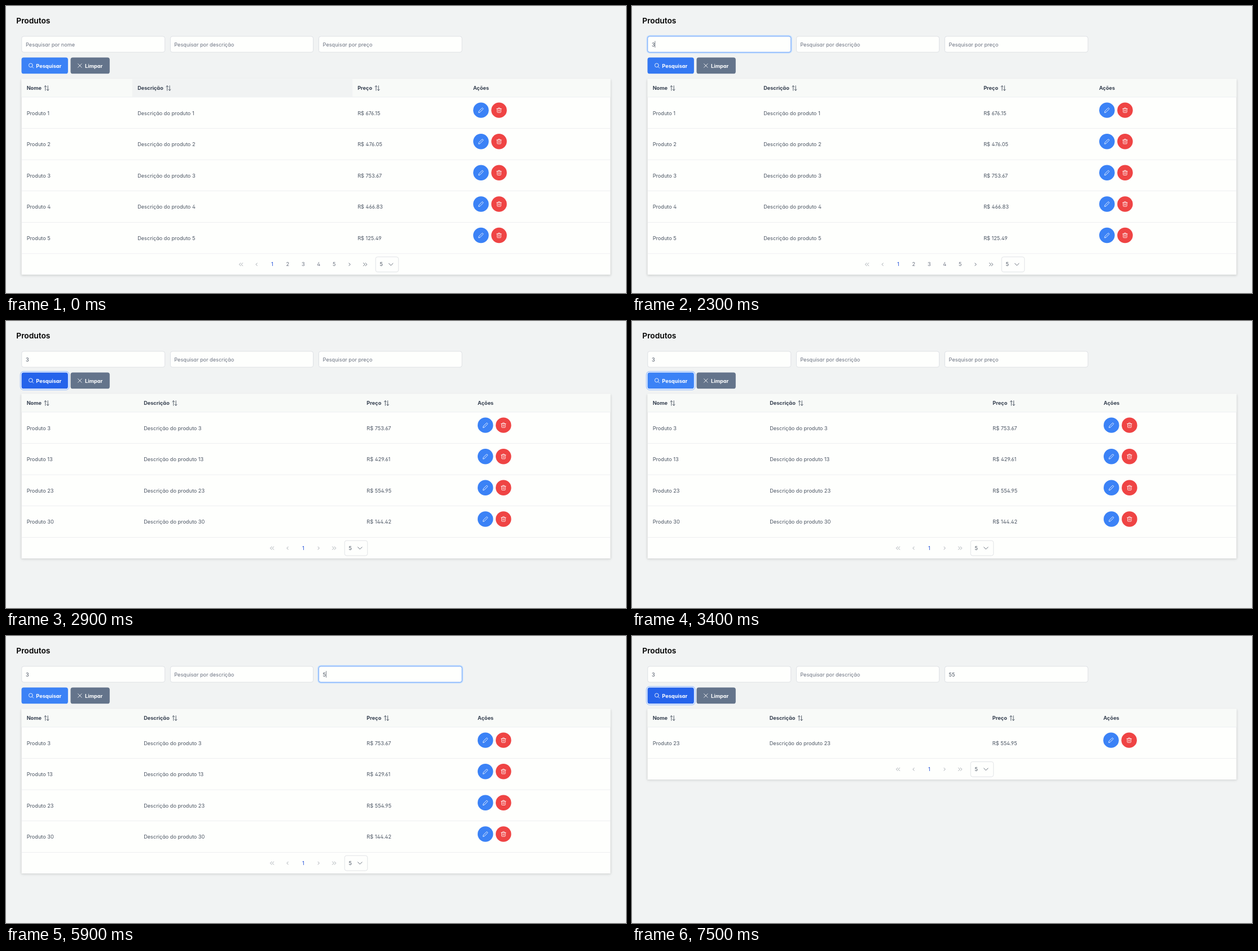
An HTML page that plays this animation: 1099 px wide and 510 px high, repeating every 8000 ms.

```html
<!DOCTYPE html>
<html lang="pt-BR">
<head>
<meta charset="utf-8">
<title>Produtos</title>
<style>
html, body { margin: 0; width: 100%; height: 100%; overflow: hidden; background: #f1f3f3; }
* { box-sizing: border-box; }
#app {
  position: absolute; left: 0; top: 0; width: 1680px; height: 780px;
  transform: scale(calc(1099 / 1680)); transform-origin: 0 0;
  font: 14px/21px Inter, sans-serif; color: #4b5563; white-space: pre;
  font-feature-settings: "cv02", "cv03", "cv04", "cv11"; font-optical-sizing: none;
}
svg { width: 14px; height: 14px; flex: none; overflow: visible; fill: none; stroke: currentColor; stroke-width: 1.3; stroke-linecap: round; stroke-linejoin: round; }
h1 { position: absolute; left: 28px; top: 27px; margin: 0; font-size: 21px; line-height: 25px; font-weight: 600; color: #000; }
.field, .button { position: absolute; height: 44px; display: flex; align-items: center; border-radius: 6px; }
.field { top: 82px; width: 388.5px; padding: 0 10.5px; background: #fefffd; border: 1px solid #d1d5db; }
.hint { color: #6b7280; }
.caret { width: 1px; height: 18px; margin-right: -1px; background: #374151; }
.button { top: 140px; padding-left: 18.5px; gap: 7px; color: #fff; font-weight: 700; }
#search { left: 42px; width: 126px; }
#clear { left: 174.5px; width: 106px; background: #64748b; }
#table {
  position: absolute; left: 42px; top: 198px; width: 1596px; background: #fefffd;
  box-shadow: 0 4px 10px rgb(0 0 0 / .03), 0 0 2px rgb(0 0 0 / .06), 0 2px 6px rgb(0 0 0 / .12);
}
.row { display: grid; height: 85px; border-bottom: 1px solid #e5e7eb; }
.row > div { display: flex; align-items: center; gap: 7px; padding-left: 14px; }
.head { height: 50px; background: #f8faf8; color: #374151; font-weight: 700; }
.row > .actions { align-items: flex-start; padding-top: 14px; }
.round { width: 42px; height: 42px; border-radius: 50%; display: grid; place-items: center; color: #fff; }
.pages { display: flex; justify-content: center; align-items: center; height: 57px; color: #6b7280; }
.pages > span { width: 42px; display: grid; place-items: center; }
.pages .on { color: #1d4ed8; }
.pages .arrow { color: #4b5563; }
.pages .off { opacity: .6; }
.size { width: 62.5px; height: 42px; margin-left: 7px; padding: 0 13px 0 10.5px; display: flex; align-items: center; justify-content: space-between; border: 1px solid #d1d5db; border-radius: 6px; color: #4b5563; }
</style>
</head>
<body>
<div id="app">
  <h1>Produtos</h1>
  <div class="field" id="name" style="left:42px"></div>
  <div class="field" id="description" style="left:444.5px"></div>
  <div class="field" id="price" style="left:847px"></div>
  <div class="button" id="search"></div>
  <div class="button" id="clear"></div>
  <div id="table"></div>
</div>
<script>
const LOOP = 8000, STEP = 100;
const $ = id => document.getElementById(id);
const icon = path => `<svg viewBox="0 0 14 14"><path d="${path}"/></svg>`;

const icons = {
  search: icon('M11.2 6A5.2 5.2 0 1 1 .8 6A5.2 5.2 0 1 1 11.2 6M9.8 9.8L13.4 13.4'),
  times: icon('M2 2L12 12M12 2L2 12'),
  sort: icon('M3.8 13.6V.6M.8 3.6L3.8 .6L6.8 3.6M10.4 .6V13.6M7.4 10.6L10.4 13.6L13.4 10.6'),
  pencil: icon('M.8 13.2L1.5 9.6L9.7 1.3Q10.7 .4 11.7 1.3L12.7 2.3Q13.6 3.3 12.7 4.3L4.4 12.5Z'),
  trash: icon('M.6 3H13.4M4.4 3V1.6Q4.4 .6 5.4 .6H8.6Q9.6 .6 9.6 1.6V3M2 3V12Q2 13.4 3.4 13.4H10.6Q12 13.4 12 12V3M5.4 6.2V10.2M8.6 6.2V10.2'),
  first: icon('M6 3L2.2 7L6 11M11.4 3L7.6 7L11.4 11'),
  prev: icon('M8.6 3.4L5.2 7L8.6 10.6'),
  next: icon('M5.4 3.4L8.8 7L5.4 10.6'),
  last: icon('M2.6 3L6.4 7L2.6 11M8 3L11.8 7L8 11'),
  down: icon('M1.4 4.2L7 9.8L12.6 4.2')
};

// Result sets: when each appears, its column starts, page count and [number, price] rows.
const results = [
  { from: 0, cols: [0, 300.4, 896.6, 1209.6], pages: 5,
    rows: [[1, '676.15'], [2, '476.05'], [3, '753.67'], [4, '466.83'], [5, '125.49']] },
  { from: 2900, cols: [0, 317.2, 921.4, 1222], pages: 1,
    rows: [[3, '753.67'], [13, '429.61'], [23, '554.95'], [30, '144.42']] },
  { from: 7500, cols: [0, 316.6, 920.6, 1221.2], pages: 1, rows: [[23, '554.95']] }
];

// Stepped tracks of [time, value]; every track starts at zero.
const tracks = {
  nameBorder: [[500, .33], [600, .67], [700, 1], [2700, .7], [2900, 0]],
  nameRing: [[900, .5], [1000, 1], [2700, .3], [2900, 0]],
  priceBorder: [[5000, .75], [5100, 1], [7400, .6], [7500, 0]],
  priceRing: [[5100, .5], [5200, 1], [7400, .5], [7500, 0]],
  press: [[2300, .33], [2400, .67], [2500, 1], [2700, 1.5], [2900, 1], [3200, .67], [3300, .33], [3400, 0],
    [7100, .75], [7200, 1], [7400, 1.4], [7500, 1]],
  searchRing: [[2900, 1], [5100, .5], [5200, 0], [7400, .5], [7500, 1]],
  nameCaret: [[1000, 1], [1500, 0], [1900, 1], [2400, 0]],
  priceCaret: [[5100, 1], [5600, 0], [5900, 1], [6700, 0]]
};
const at = (track, t) => tracks[track].reduce((value, [time, next]) => t >= time ? next : value, 0);
const mix = (a, b, k) => `color-mix(in srgb, ${b} ${k * 100}%, ${a})`;

function tableHtml({ cols, pages, rows }) {
  const widths = cols.map((x, i) => (cols[i + 1] ?? 1596) - x + 'px').join(' ');
  const row = (cells, cls = '') => `<div class="row ${cls}" style="grid-template-columns:${widths}">${cells}</div>`;
  const cell = html => `<div>${html}</div>`;
  const arrow = (name, off) => `<span class="arrow ${off ? 'off' : ''}">${icons[name]}</span>`;
  const actions = `<div class="actions"><span class="round" style="background:#3b82f6">${icons.pencil}</span>` +
    `<span class="round" style="background:#ef4444">${icons.trash}</span></div>`;
  const head = ['Nome', 'Descrição', 'Preço'].map(label => cell(label + icons.sort)).join('') + cell('Ações');
  const body = rows.map(([n, price]) =>
    row(cell(`Produto ${n}`) + cell(`Descrição do produto ${n}`) + cell(`R$ ${price}`) + actions)).join('');
  const numbers = Array.from({ length: pages }, (_, i) => `<span class="${i ? '' : 'on'}">${i + 1}</span>`).join('');
  const single = pages === 1;
  return row(head, 'head') + body + '<div class="pages">' + arrow('first', true) + arrow('prev', true) + numbers +
    arrow('next', single) + arrow('last', single) + `<div class="size">5${icons.down}</div></div>`;
}

function setField(id, text, hint, caret = 0, border = 0, ring = 0) {
  const mark = caret ? '<i class="caret"></i>' : '';
  const el = $(id);
  el.innerHTML = text ? text + mark : `${mark}<span class="hint">${hint}</span>`;
  el.style.borderColor = mix('#d1d5db', '#3b82f6', border);
  el.style.boxShadow = `0 0 0 2.8px rgb(191 219 254 / ${ring})`;
}

function render(t) {
  const result = results.findLast(r => t >= r.from);
  if (result !== shown) $('table').innerHTML = tableHtml(shown = result);
  $('table').querySelector('.head').children[1].style.background = t < 100 ? '#f1f3f3' : '';

  setField('name', t >= 1900 ? '3' : '', 'Pesquisar por nome',
    at('nameCaret', t), at('nameBorder', t), at('nameRing', t));
  setField('price', t >= 6100 ? '55' : t >= 5900 ? '5' : '', 'Pesquisar por preço',
    at('priceCaret', t), at('priceBorder', t), at('priceRing', t));

  const press = at('press', t), ring = at('searchRing', t);
  $('search').style.background = press > 1 ? mix('#2563eb', '#1d4ed8', press - 1) : mix('#3b82f6', '#2563eb', press);
  $('search').style.boxShadow = `0 0 0 2px rgb(255 255 255 / ${ring}), 0 0 0 4px rgb(157 193 251 / ${ring})`;
}

let shown, lastStep;
function frame() {
  const step = Math.floor(performance.now() % LOOP / STEP);
  if (step !== lastStep) render((lastStep = step) * STEP);
  requestAnimationFrame(frame);
}

$('search').innerHTML = icons.search + 'Pesquisar';
$('clear').innerHTML = icons.times + 'Limpar';
setField('description', '', 'Pesquisar por descrição');
frame();
</script>
</body>
</html>
```
